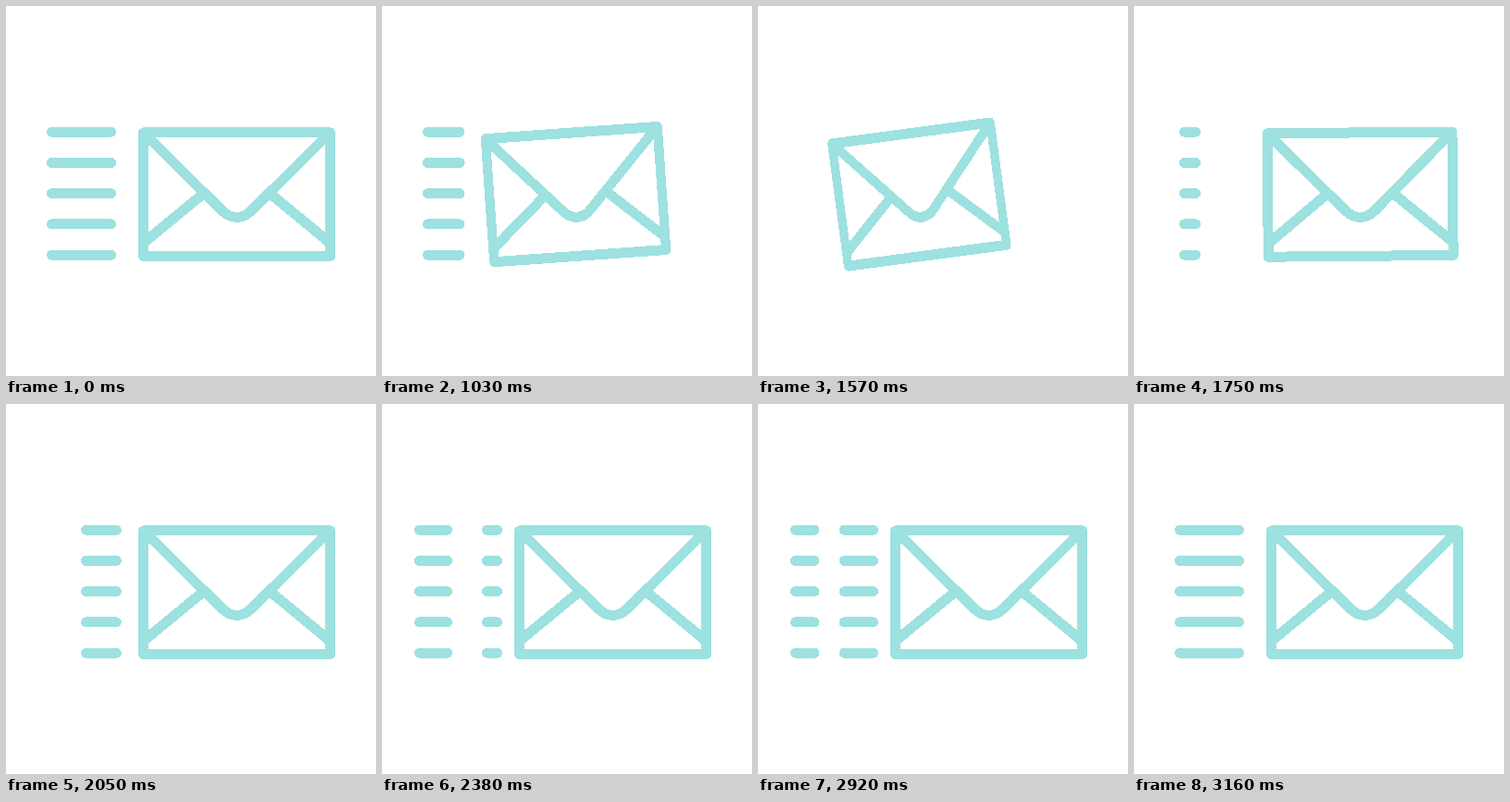
These frames come from a looping animation (400 by 400 pixels, 3220 ms). An HTML page:

```html
<!DOCTYPE html>
<html lang="en">
<head>
<meta charset="utf-8">
<title>Flying envelope</title>
<style>
  html, body { margin: 0; width: 100%; height: 100%; overflow: hidden; background: #fff; }
  svg { display: block; width: 100%; height: 100%; shape-rendering: crispEdges; }
  path { fill: none; stroke: #9de1e0; stroke-width: 11; stroke-linecap: round; stroke-linejoin: round; }
</style>
</head>
<body>
<svg viewBox="0 0 400 400">
  <path id="streaks"/>
  <g id="envelope">
    <path d="M148.7 136.9H350.6V270.3H148.7Z"/>
    <path d="M149 137.3L234 221.6C243 230.6 256 230.6 265 221.6L350 137.3"/>
    <path d="M212 204L149.5 255.5M287 204L349.5 255.5"/>
  </g>
</svg>
<script>
const LOOP = 3220, REST = 1030, STEP = 30, LAST = 71;
const CENTER = { x: 249.5, y: 203.4 };
const TRACK = { left: 40.5, right: 124.5 };
const SPAN = TRACK.right - TRACK.left;
const HOME = { start: 49.5, length: 64 };
const ROWS = [0, 1, 2, 3, 4].map(i => 136.2 + 33.25 * i);

const envelope = document.getElementById('envelope');
const streaks = document.getElementById('streaks');

const progress = (k, from, to) => Math.min(1, Math.max(0, (k - from) / (to - from)));
const ease = t => t * t * (3 - 2 * t);

// Linear interpolation through [step, value] pairs.
function along(points, k) {
  let i = 1;
  while (i < points.length - 1 && k > points[i][0]) i++;
  const [a, from] = points[i - 1], [b, to] = points[i];
  return from + (to - from) * progress(k, a, b);
}

// The streak runs left and wraps around the track.
const streakStart = [[18, 85.7], [24, 54.5], [45, -54.5], [56, -120.5], [71, -202.5]];
const streakLength = [[18, 0], [24, 12], [38, 41], [56, 41], [71, 64]];

function streakAt(k) {
  if (k === null) return HOME;
  if (k < 18) {
    return { start: HOME.start, length: HOME.length * (1 - ease(progress(k, -9, 10))) };
  }
  return { start: along(streakStart, k), length: along(streakLength, k) };
}

function streakPath({ start, length }) {
  if (length < 0.01) return '';
  const first = TRACK.left + (((start - TRACK.left) % SPAN) + SPAN) % SPAN;
  let d = '';
  for (const x of [first - SPAN, first]) {
    const a = Math.max(x, TRACK.left), b = Math.min(x + length, TRACK.right);
    if (b > a) for (const y of ROWS) d += `M${a} ${y}H${b}`;
  }
  return d;
}

function draw(time) {
  const t = time % LOOP;
  const k = t < REST ? null : Math.min(LAST, Math.floor((t - REST) / STEP));
  const pull = k === null ? 0
    : ease(progress(k, -9.3, 12)) - ease(progress(k, 14.5, 25.5));
  envelope.setAttribute('transform',
    `translate(${CENTER.x - 99 * pull} ${CENTER.y}) rotate(${-10 * pull}) ` +
    `scale(${1 - 0.19 * pull} 1) translate(${-CENTER.x} ${-CENTER.y})`);
  streaks.setAttribute('d', streakPath(streakAt(k)));
}

const begin = performance.now();
function tick() {
  draw(performance.now() - begin);
  requestAnimationFrame(tick);
}
tick();
</script>
</body>
</html>
```
